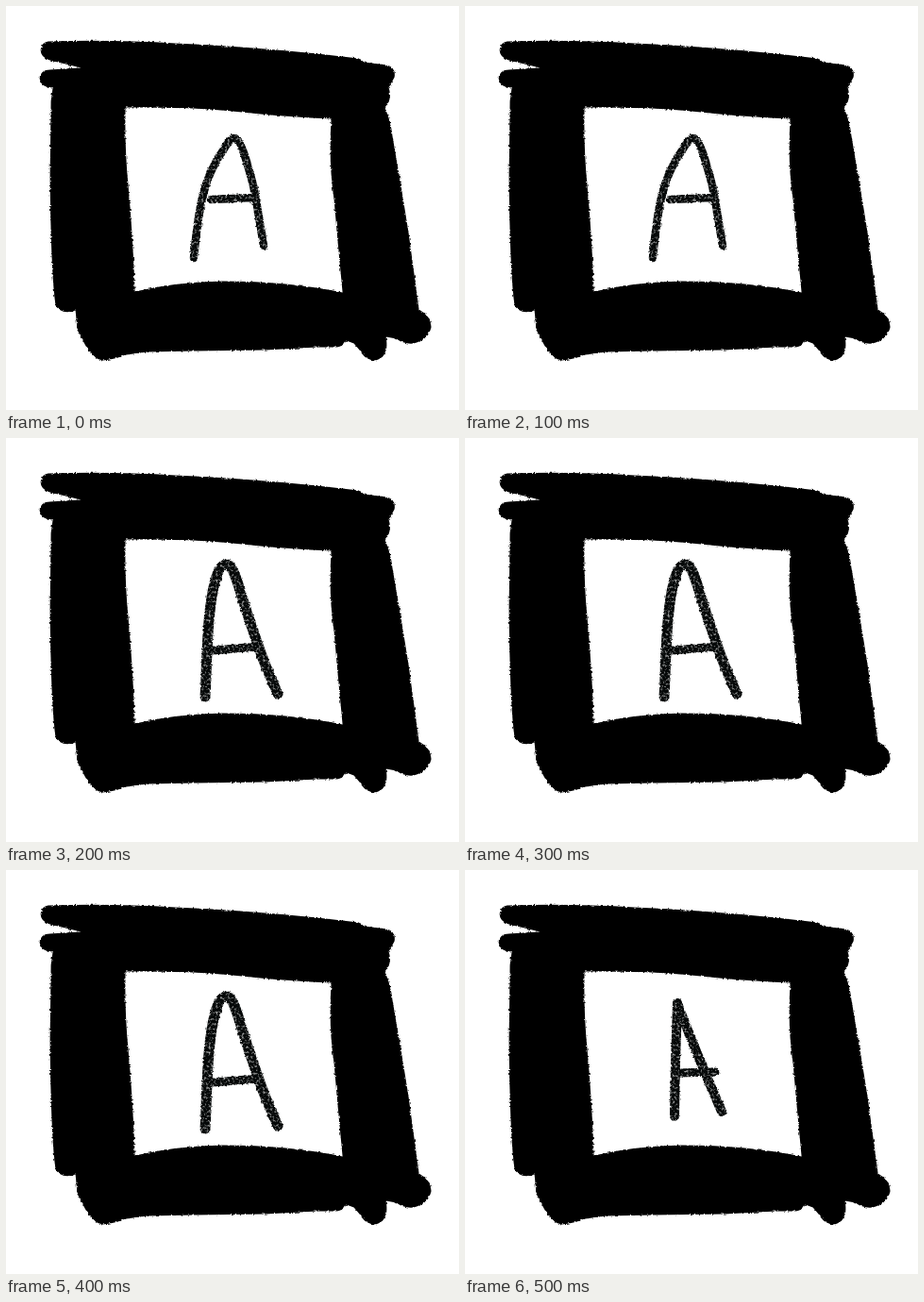
Recreate the animation shown at these times as an HTML page. Size 480 by 428 pixels, loop 600 ms.

```html
<!DOCTYPE html>
<html lang="en">
<head>
<meta charset="utf-8">
<title>Framed letter</title>
<style>
  html, body { margin: 0; width: 100%; height: 100%; overflow: hidden; background: #fff; }
  svg { display: block; width: 100%; height: 100%; }
  .pose { fill: none; stroke: #050808; stroke-linecap: round; stroke-linejoin: round; visibility: hidden; }
</style>
</head>
<body>
<svg viewBox="0 0 480 428">
  <defs>
    <!-- crayon edge -->
    <filter id="edge" filterUnits="userSpaceOnUse" x="0" y="0" width="480" height="428" color-interpolation-filters="sRGB">
      <feTurbulence type="fractalNoise" baseFrequency="0.4" numOctaves="2" seed="4"/>
      <feDisplacementMap in="SourceGraphic" scale="3" xChannelSelector="R" yChannelSelector="G"/>
      <feGaussianBlur stdDeviation="0.7"/>
    </filter>
    <!-- crayon edge with paper grain showing through -->
    <filter id="grain" filterUnits="userSpaceOnUse" x="0" y="0" width="480" height="428" color-interpolation-filters="sRGB">
      <feTurbulence type="fractalNoise" baseFrequency="0.4" numOctaves="2" seed="4" result="noise"/>
      <feDisplacementMap in="SourceGraphic" in2="noise" scale="3" xChannelSelector="R" yChannelSelector="G" result="rough"/>
      <feColorMatrix in="noise" values="0 0 0 0 0  0 0 0 0 0  0 0 0 0 0  0 0 2 0 0" result="paper"/>
      <feComposite in="rough" in2="paper" operator="in"/>
      <feGaussianBlur stdDeviation="0.7"/>
    </filter>
  </defs>
  <g filter="url(#edge)">
    <path fill-rule="evenodd" transform="translate(-.4 .5)" d="
      M45 37 Q115 35 180 39 Q250 42 330 50 L374 55 L380 59 L404 62 Q414 65 412 75 L406 86
      Q410 98 402 108 Q408 120 410 138 L419 190 L427 240 L438 321 Q451 328 451 340 Q447 354 432 357
      Q422 358 414 352 L403 350 Q407 371 392 375 Q381 375 375 364 L369 357 L361 354
      Q357 362 346 361 L330 361 L275 364 L200 365 L150 366 L128 369 Q115 374 103 375
      Q91 373 84 358 L76 343 L74 322 Q59 327 53 317 Q48 285 47 180 L48 100 L50 86
      Q37 86 36 76 Q37 67 47 67 L80 65 L47 57 Q37 54 37 46 Q38 38 45 37 Z
      M127 107 Q205 106 260 113 Q300 117 345 119 Q342 165 348 205 L352 250 L357 303
      Q300 291 230 291 Q180 292 137 302 Q135 245 130 190 Q126 150 127 107 Z"/>
  </g>
  <g filter="url(#grain)">
    <g class="pose" stroke-width="8.5">
      <path d="M199 267C201 245 203 225 208 203C213 182 222 164 230 153C235 144 239 140 242 140C248 140 254 160 262 190C266 210 269 230 273 254M217 205L264 203"/>
    </g>
    <g class="pose" stroke-width="11">
      <path d="M211 274C212 262 212 245 213 228C214 200 217 165 223 147C226 137 230 134 234 134C239 135 242 143 246 155C252 175 262 205 268 222C274 240 282 258 288 271"/>
      <path stroke-width="9" d="M220 225L267 221"/>
    </g>
    <g class="pose" stroke-width="10">
      <path d="M222 261L223 205L225 141C235 168 250 205 272 256"/>
      <path stroke-width="9" d="M226 215L265 214"/>
    </g>
  </g>
</svg>
<script>
  const LOOP = 600;
  const spans = [[0, 200], [200, 500], [500, 600]];

  document.querySelectorAll('.pose').forEach((pose, i) => {
    const [from, to] = spans[i];
    const step = (ms, visibility) => ({ offset: ms / LOOP, visibility, easing: 'steps(1, end)' });
    const steps = [step(from, 'visible'), step(to, to < LOOP ? 'hidden' : 'visible')];
    if (from > 0) steps.unshift(step(0, 'hidden'));
    if (to < LOOP) steps.push(step(LOOP, 'hidden'));
    pose.animate(steps, { duration: LOOP, iterations: Infinity }).startTime = 0;
  });
</script>
</body>
</html>
```
